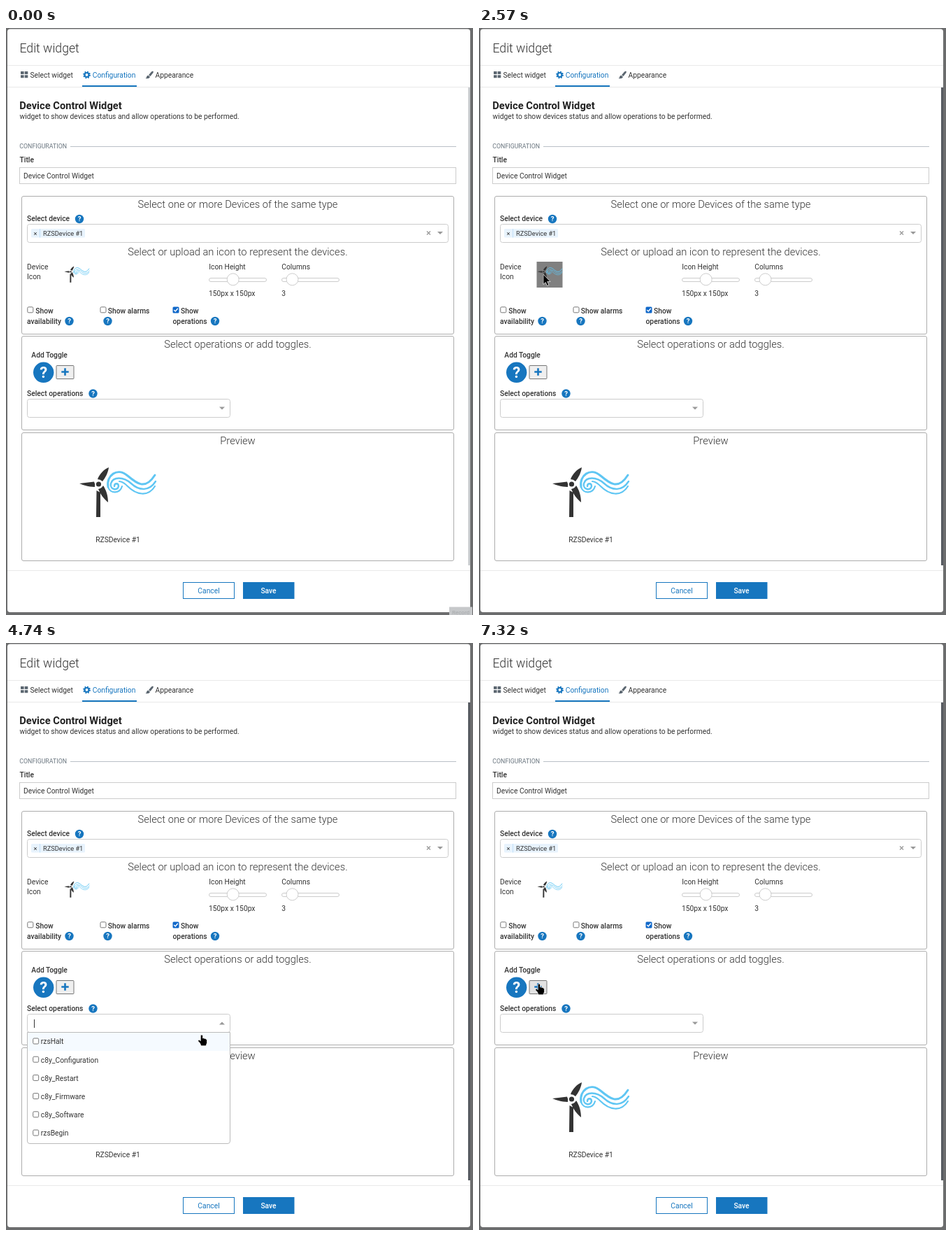
Animation of 668 by 839 pixels, one loop 8 s. Source, as an HTML page:

```html
<!DOCTYPE html>
<html lang="en">
<head>
<meta charset="utf-8">
<title>Edit widget</title>
<style>
html, body { margin: 0; width: 100%; height: 100%; overflow: hidden; background: #6c6d6e; }
svg { display: block; font: 10.29px Roboto, sans-serif; fill: #333; }
.h { font-size: 14.7px; font-weight: 300; text-anchor: middle; }
.m { font-weight: 500; }
.box { fill: #fff; stroke: #adadad; }
.field { fill: #fff; stroke: #ccc; }
.check { fill: #fff; stroke: #767676; }
.blue { fill: #1776bf; }
.grey { fill: #999; }
.rule { stroke: #e9e9e9; }
.q { fill: #fff; font-weight: 700; text-anchor: middle; }
.wind { fill: none; stroke: #5fc6f3; stroke-linecap: round; }
</style>
</head>
<body>
<svg width="668" height="839" viewBox="0 0 668 839">
<defs>
  <g id="help"><circle r="6.2" class="blue"/><text class="q" y="3.4" font-size="9.5">?</text></g>
  <rect id="check" class="check" width="8" height="8" rx="1.5"/>
  <path id="down" class="grey" d="M-4-2h8L0 2z"/>
  <g id="slider">
    <rect class="field" y="-2.5" width="82" height="5" rx="2.5"/>
  </g>
  <g id="turbine">
    <path d="M105 651L126 648.5Q128 652 127 656C118 656 110 653 105 651z
      M131 645C134 637 140 631 147 628C146 636 142 643 138 648Q135 645 131 645z
      M139 654C143 660 146 668 146 678C139 672 135 666 132 659Q137 658 139 654z
      M129.5 661L135 664V699H129z"/>
    <circle cx="132.5" cy="652" r="3.6"/>
    <path class="wind" stroke-width="3" d="M146 656C143 640 159 627 174 640C187 651 199 661 213 639"/>
    <path class="wind" stroke-width="2.4" d="M214 648C205 662 191 662 179 651C168 641 153 641 150 651C148 660 160 662 161 655C161 650 155 650 155 655"/>
    <path class="wind" stroke-width="2.2" d="M213 655C203 671 186 667 174 655C170 651 166 648 162 648M146 656C149 666 163 666 166 655"/>
  </g>
</defs>

<rect x="2" y="1.5" width="662" height="833.5" rx="4" fill="#fff"/>
<path class="rule" d="M2 53.5H664M2 84.5H664M2 775.5H664"/>
<rect id="bar" y="85" height="683"/>

<text x="19.5" y="34.5" font-size="17.64" font-weight="300">Edit widget</text>
<path fill="#5b6670" d="M21 62h4.6v4H21zM26.7 62h4.6v4h-4.6zM21 67.3h4.6v4H21zM26.7 67.3h4.6v4h-4.6z"/>
<text x="34.5" y="71">Select widget</text>
<g transform="translate(115.5 67)" fill="none" stroke="#1776bf">
  <circle r="3" stroke-width="2.2"/>
  <circle r="4.5" stroke-width="1.8" stroke-dasharray="1.8 1.734"/>
</g>
<text x="123.7" y="71" class="blue">Configuration</text>
<rect x="109" y="82" width="78" height="2" class="blue"/>
<path fill="#5b6670" d="M210 61.5Q211.500 62 210.500 64L206.500 69L204 67.200L208 62.500zM203.300 67.700L206 69.700Q205 73 199.500 72Q201.500 71 201.200 69.500Q201.600 67.700 203.300 67.700z"/>
<text x="213.5" y="71">Appearance</text>

<text x="19.3" y="116" font-size="14.7" font-weight="700" fill="#222">Device Control Widget</text>
<text x="19.5" y="130">widget to show devices status and allow operations to be performed.</text>
<text x="19.3" y="172.3" font-size="8.82" fill="#68747e">CONFIGURATION</text>
<path stroke="#b9c0c6" d="M92 169.500H644"/>
<text x="19.5" y="191.500" class="m">Title</text>
<rect class="field" x="19.5" y="199.500" width="624" height="23"/>
<text x="25" y="214.500">Device Control Widget</text>

<rect class="box" x="22.5" y="240.500" width="618" height="197" rx="2.5"/>
<text class="h" x="331.500" y="257">Select one or more Devices of the same type</text>
<text class="m" x="30" y="275.500">Select device</text>
<use href="#help" x="105" y="273"/>
<rect id="device" class="field" x="30.500" y="280.500" width="602" height="26" rx="3"/>
<rect x="36" y="287" width="77" height="12.500" rx="1.500" fill="#e8f3fd"/>
<path stroke="#c2e0f8" d="M48.500 287V299.500"/>
<text x="39.500" y="296.500" font-size="9.260">×</text>
<text x="53" y="296.700" font-size="9.260">RZSDevice #1</text>
<path stroke="#999" stroke-width="1.300" d="M602 290.500l5 5m0-5l-5 5"/>
<use href="#down" x="621" y="293"/>

<text class="h" x="331.500" y="325">Select or upload an icon to represent the devices.</text>
<text x="30" y="344.500">Device</text>
<text x="30" y="359">Icon</text>
<rect id="iconHover" x="82.500" y="334" width="37" height="37" fill="#808080"/>
<use href="#turbine" transform="translate(83.500 340.500) scale(.327) translate(-105 -628)"/>
<text x="290.300" y="344.500">Icon Height</text>
<text x="394.300" y="344.500">Columns</text>
<use href="#slider" x="290.500" y="360"/>
<use href="#slider" x="394.500" y="360"/>
<circle class="field" cx="324.700" cy="359.300" r="8.500"/>
<circle class="field" cx="409.500" cy="359.300" r="8.500"/>
<text x="290" y="382.500">150px x 150px</text>
<text x="394.300" y="382.500">3</text>
<use href="#check" x="30.800" y="398.800"/>
<use href="#check" x="135" y="398.800"/>
<rect x="238.500" y="398.500" width="9" height="9" rx="1.500" fill="#1068c9"/>
<path fill="none" stroke="#fff" stroke-width="1.500" d="M240.300 403l2 2 3.500-4.200"/>
<g class="m">
  <text x="42.300" y="407.500">Show</text>
  <text x="30" y="422.500">availability</text>
  <text x="145.800" y="407.500">Show alarms</text>
  <text x="250" y="407.500">Show</text>
  <text x="238.500" y="422.500">operations</text>
</g>
<use href="#help" x="90.500" y="419"/>
<use href="#help" x="145.500" y="419"/>
<use href="#help" x="299" y="419"/>

<rect class="box" x="22.500" y="440.500" width="618" height="134" rx="2.500"/>
<text class="h" x="331.500" y="457">Select operations or add toggles.</text>
<text class="m" x="36.300" y="470.500">Add Toggle</text>
<circle class="blue" cx="53.700" cy="492.300" r="14.700"/>
<text class="q" x="53.700" y="500" font-size="22">?</text>
<rect id="add" x="72" y="482.500" width="25" height="19" rx="1" stroke="#767676"/>
<path stroke="#1776bf" stroke-width="2.600" d="M79.300 491.500h10.400M84.500 486.300v10.400"/>
<text class="m" x="30" y="525.500">Select operations</text>
<use href="#help" x="124.500" y="522.500"/>
<rect class="field" x="30.500" y="530.500" width="290" height="26" rx="3"/>
<use id="closedArrow" href="#down" x="309" y="543.500"/>

<rect class="box" x="22.500" y="578.500" width="618" height="183" rx="2.500"/>
<text class="h" x="331.500" y="595">Preview</text>
<use href="#turbine"/>
<text x="160" y="734.500" text-anchor="middle">RZSDevice #1</text>

<g id="menu">
  <path d="M30.500 556.500H320.500V712Q320.500 715.500 317 715.500H34Q30.500 715.500 30.500 712z" fill="#fff" stroke="#bbb"/>
  <rect x="31" y="557" width="289" height="26" fill="#f5faff"/>
  <path class="grey" d="M305 545.500h8l-4-4z"/>
  <path id="caret" stroke="#333" d="M40.500 538V550"/>
  <g id="rows"></g>
</g>

<rect class="blue" x="339" y="792" width="73.500" height="24"/>
<rect x="253.500" y="792.500" width="73" height="23" fill="#fff" stroke="#1776bf"/>
<g text-anchor="middle">
  <text x="290" y="808" class="blue">Cancel</text>
  <text x="375.500" y="808" class="m" fill="#fff">Save</text>
</g>

<g id="corner">
  <rect x="634" y="827.500" width="33" height="11.500" fill="#c6c8ca"/>
  <text x="638" y="838" font-size="8" fill="#a5a8ab">Record</text>
</g>
<g id="cursor" stroke="#fff" stroke-width=".7" fill="#000">
  <path id="arrow" d="M0 0V14.500L3.300 11.500L5.600 16.500L8 15.400L5.700 10.500H10z"/>
  <path id="hand" d="M-1.700 1Q0-1 1.500 1V5Q3 4 4 5.500Q5.500 5 6 6.300Q7.500 6 7.500 8V11.500L6 15.800H-1L-2.500 12L-5.300 9Q-5.300 7-3.300 7.300L-1.700 8.700z"/>
</g>
</svg>
<script>
const LOOP = 8000;
const $ = id => document.getElementById(id);

// time, x, y, pointing hand
const path = [
  [600, 650, 822, 0], [790, 556, 694, 0], [980, 410, 570, 0], [1180, 301, 492, 0],
  [1770, 292, 492, 0],
  [2170, 200, 430, 0], [2370, 115, 370, 0], [2570, 92, 352, 0],
  [2760, 93, 351, 0], [2960, 98, 340, 0], [3160, 126, 297, 0],
  [3360, 155, 345, 0], [3560, 235, 440, 0], [3760, 300, 525, 0], [3950, 311, 540, 1],
  [4340, 311, 541, 1], [4740, 280, 560, 1], [4940, 200, 595, 1], [5140, 130, 640, 1],
  [5330, 92, 690, 1], [5530, 81, 713, 1], [5720, 82, 714, 1],
  [5920, 210, 655, 0], [6120, 370, 575, 0], [6320, 434, 545, 0], [6520, 432, 541, 0],
  [6720, 240, 515, 0], [6920, 79, 490, 1], [7120, 82, 489, 1], [7320, 86, 487, 1]
];

$('rows').innerHTML = ['rzsHalt', 'c8y_Configuration', 'c8y_Restart', 'c8y_Firmware', 'c8y_Software', 'rzsBegin']
  .map((name, i) => {
    const y = 573.3 + i * 26.2;
    return `<use href="#check" x="38.700" y="${y - 8.300}"/><text x="49.800" y="${y}">${name}</text>`;
  }).join('');

const show = (id, on) => $(id).style.display = on ? '' : 'none';
const set = (id, attrs) => Object.entries(attrs).forEach(([k, v]) => $(id).setAttribute(k, v));

function draw(now) {
  const t = now % LOOP;
  const within = (from, to) => t >= from && t < to;
  const open = within(4340, 6320);
  const pos = path.findLast(p => p[0] <= t);

  show('corner', t < 190);
  set('bar', t < 600
    ? { x: 661.5, width: 2, fill: '#b5b9bd' }
    : { x: 661, width: 3, fill: '#575b61' });
  show('iconHover', within(2370, 3160));
  $('device').style.stroke = within(3160, 3360) ? '#bbb' : '';
  set('add', { fill: t >= 6920 ? '#e2e2e2' : '#efefef' });
  show('menu', open);
  show('closedArrow', !open);
  show('caret', !within(4940, 5330));

  show('cursor', pos);
  if (pos) {
    const [, x, y, hand] = pos;
    set('cursor', { transform: `translate(${x} ${y})` });
    show('hand', hand);
    show('arrow', !hand);
  }
  requestAnimationFrame(draw);
}
requestAnimationFrame(draw);
</script>
</body>
</html>
```
